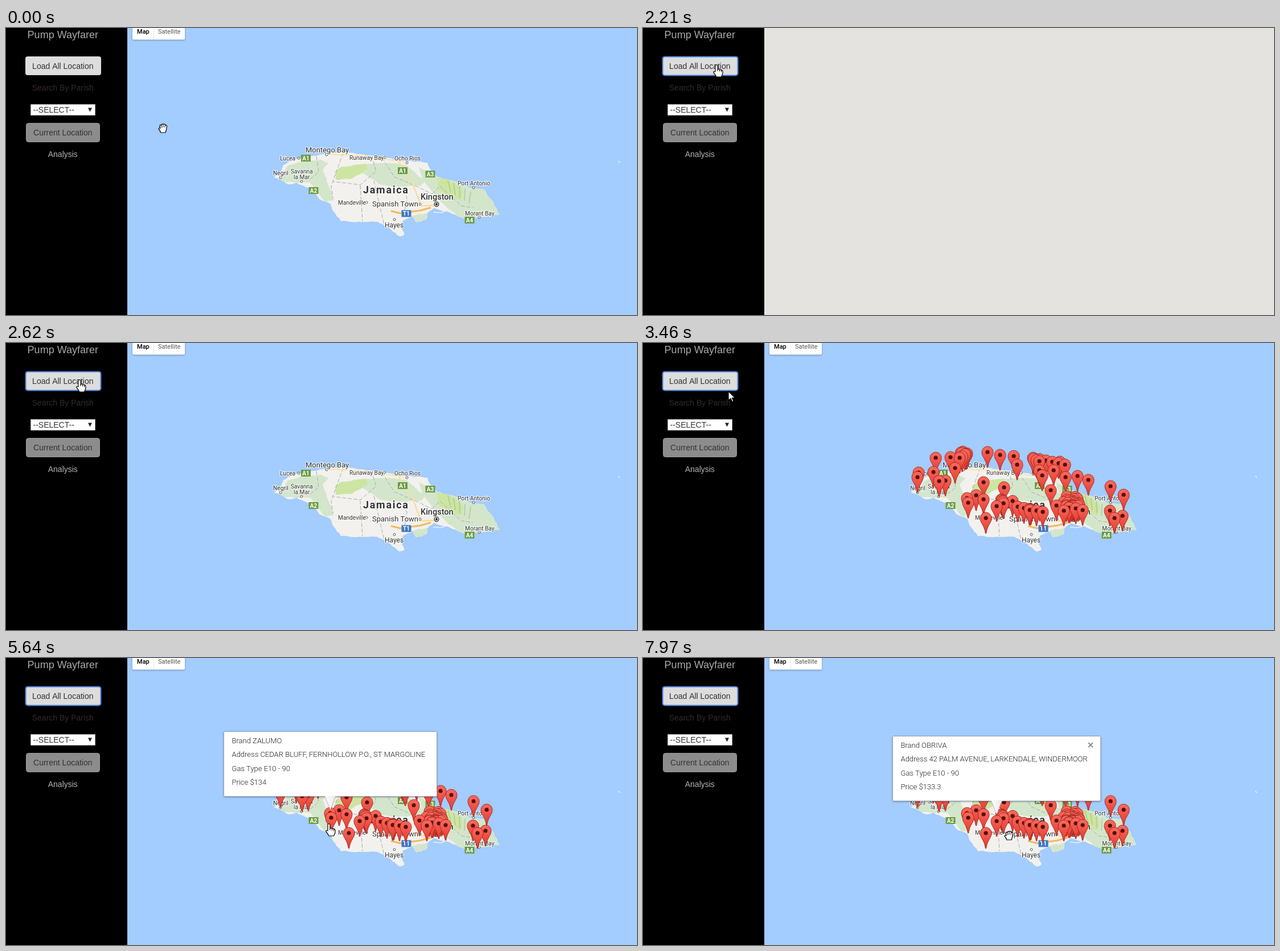
Write an HTML page with a canvas that moves like this. It is 1108 px wide and 505 px high and loops after 8000 ms.

```html
<!DOCTYPE html>
<html lang="en">
<head>
<meta charset="utf-8">
<title>Fuel station map</title>
<style>
html, body { margin: 0; width: 100%; height: 100%; overflow: hidden; background: #000; }
canvas { display: block; width: 1108px; height: 505px; }
</style>
</head>
<body>
<canvas id="stage" width="1108" height="505"></canvas>
<script>
const W = 1108, H = 505, LOOP = 8000, SIDE = 213;
const ctx = document.getElementById('stage').getContext('2d');
const ARIAL = '"Liberation Sans", Arial, sans-serif';
const ROBOTO = 'Roboto, sans-serif';

function text(c, str, x, y, font, color, align = 'left') {
  c.font = font;
  c.fillStyle = color;
  c.textAlign = align;
  c.fillText(str, x, y);
}

function box(c, x, y, w, h, r, fill, stroke) {
  c.beginPath();
  c.roundRect(x, y, w, h, r);
  if (fill) { c.fillStyle = fill; c.fill(); }
  if (stroke) { c.strokeStyle = stroke; c.stroke(); }
}

function dot(c, x, y, r, fill, stroke) {
  c.beginPath();
  c.arc(x, y, r, 0, 7);
  c.fillStyle = fill;
  c.fill();
  if (stroke) { c.strokeStyle = stroke; c.stroke(); }
}

function line(c, path, color, width, dash = []) {
  c.setLineDash(dash);
  c.strokeStyle = color;
  c.lineWidth = width;
  c.stroke(new Path2D(path));
  c.setLineDash([]);
}

function area(c, path, color) {
  c.fillStyle = color;
  c.fill(new Path2D(path));
}

function layer(paint) {
  const cv = document.createElement('canvas');
  cv.width = W;
  cv.height = H;
  paint(cv.getContext('2d'));
  return cv;
}

function random(seed) {
  return () => (seed = seed * 16807 % 2147483647) / 2147483647;
}

const pairs = flat => flat.flatMap((v, i) => i % 2 ? [] : [[v, flat[i + 1]]]);

// Closed outline whose edges get a slight seeded wobble.
function coast(flat, wobble = 1) {
  const rnd = random(19), pts = pairs(flat), path = new Path2D();
  pts.forEach(([x, y], i) => {
    const [nx, ny] = pts[(i + 1) % pts.length];
    const n = Math.ceil(Math.hypot(nx - x, ny - y) / 6);
    for (let k = 0; k < n; k++) {
      const j = k ? wobble : 0, u = k / n;
      path.lineTo(x + (nx - x) * u + (rnd() * 2 - 1) * j, y + (ny - y) * u + (rnd() * 2 - 1) * j);
    }
  });
  path.closePath();
  return path;
}

/* ---- Map ---- */
const island = coast([
  470,263, 479,256, 487,241, 505,232, 528,227, 556,222, 568,219, 592,219, 622,222, 660,227,
  700,234, 724,235, 740,237, 744,247, 757,262, 786,269, 815,281, 838,283, 853,303, 867,328,
  835,333, 806,336, 780,325, 751,317, 740,326, 738,337, 720,342, 714,331, 697,339, 693,348,
  700,363, 691,367, 674,353, 652,341, 620,341, 588,340, 573,320, 570,310, 550,301, 536,284,
  510,272, 496,275, 480,266]);

function badge(c, str, x, y, color = '#6b9c41') {
  c.fillStyle = color;
  c.fillRect(x - 8.5, y - 6, 17, 12);
  text(c, str, x, y + 3.5, '700 10px ' + ROBOTO, '#fff', 'center');
}

function label(c, str, x, y, size = 10.2, weight = 400) {
  c.lineJoin = 'round';
  c.lineWidth = 2.5;
  c.font = `${weight} ${size}px ${ROBOTO}`;
  c.strokeStyle = 'rgba(255,255,255,.75)';
  c.textAlign = 'left';
  c.strokeText(str, x, y);
  text(c, str, x, y, c.font, '#333');
}

// A town: name, label position, offset of its dot, label size.
const towns = [
  ['Lucea', 481, 233, 33, -4], ['Negril', 469, 259, 13, 4], ['Savanna', 500, 256, 19, 14],
  ['Runaway Bay', 603, 232, 61, -4], ['Ocho Rios', 682, 233, 22, 4], ['Port Antonio', 793, 277, 28, 4],
  ['Mandeville', 583, 311, 50, -4], ['Morant Bay', 806, 330, 25, 3], ['Montego Bay', 526, 219, 37, 4, 13],
  ['Spanish Town', 643, 314, 84, -4, 13], ['Hayes', 665, 351, 17, -14, 12]];

const mapLayer = layer(c => {
  const green = '#d3e6cb', lime = '#cde5a3', road = '#fbdd98';
  c.fillStyle = '#a3ccff';
  c.fillRect(SIDE, 0, W - SIDE, H);
  c.lineJoin = 'round';
  area(c, island, '#f2f1ee');
  c.save();
  c.clip(island);
  area(c, coast([476,270, 494,243, 524,234, 554,232, 566,238, 556,250, 568,282, 576,303, 560,306, 534,272]), green);
  area(c, coast([612,247, 636,239, 684,238, 704,242, 736,270, 728,278, 690,279, 658,276, 644,266]), green);
  area(c, coast([578,252, 590,244, 634,239, 635,248, 608,265, 579,267]), lime);
  area(c, coast([724,244, 756,262, 845,284, 868,332, 800,336, 764,306, 732,268]), green);
  area(c, coast([757,264, 774,264, 798,280, 803,292, 798,304, 760,286]), lime);
  area(c, coast([714,330, 740,325, 738,345, 716,342]), green);
  const hill = 'rgba(140,175,120,.4)';
  for (let i = 0; i < 5; i++) line(c, `M${776 + i * 10} ${268 + i * 5}l${5 - i * 2} 21`, hill, 2);
  line(c, 'M545 226L549 254 534 266M592 220L571 278 574 300M642 225L650 252 622 276 574 270M660 228L682 262 724 280 748 292M622 277L626 340M646 269L664 346M748 292L762 278 800 313 820 316M690 279L704 298 700 322', '#aaa', 1, [7, 3]);
  line(c, 'M568 222L630 225 700 236', '#fbe3a2', 2);
  line(c, 'M690 236L714 274 727 308M728 313L756 312', road, 2.3);
  line(c, 'M676 322L692 326 728 321 746 316', '#f5b95c', 3);
  c.restore();
  line(c, 'M750 324L764 325 772 322M1075 234L1078 237', '#f2f1ee', 1.5);

  c.lineWidth = 1;
  for (const [, x, y, dx, dy] of towns) dot(c, x + dx, y + dy, 2, '#fff', '#555');
  c.lineWidth = 1.3;
  dot(c, 756, 310, 3.8, '#fff', '#222');
  dot(c, 756, 310, 2, '#222');

  badge(c, 'A1', 526.5, 229);
  badge(c, 'A2', 540, 286);
  badge(c, 'A1', 696.5, 251);
  badge(c, 'A3', 745, 257);
  badge(c, 'A4', 814, 338);
  badge(c, 'T1', 703, 326.5, '#3d78c8');

  for (const [name, x, y, , , size] of towns) label(c, name, x, y, size);
  label(c, 'la Mar', 505, 266);
  label(c, 'Kingston', 728, 302, 14.5, 500);
  c.letterSpacing = '1.7px';
  label(c, 'Jamaica', 627, 291, 18, 700);
});

/* ---- Pins: head centres, tip 27px below ---- */
const pins = pairs([
  484,228, 482,236, 514,202, 510,227, 520,243, 531,242, 540,201, 556,202, 548,220, 605,192,
  627,197, 651,199, 657,214, 598,245, 634,254, 569,273, 571,281, 585,268, 598,275, 602,308,
  621,287, 633,282, 649,278, 696,224, 701,233, 721,224, 742,236, 763,234, 782,241, 716,259,
  821,252, 844,267, 820,295, 842,304, 828,308, 726,286, 739,295, 760,291, 772,294]);

const rnd = random(71);
function scatter(n, x, y, w, h) {
  for (let i = 0; i < n; i++) pins.push([x + w * rnd(), y + h * rnd()]);
}
function row(n, x, y, dx, dy) {
  for (let i = 0; i < n; i++) pins.push([x + dx * i, y + dy * i]);
}
scatter(7, 558, 189, 11, 12);
scatter(24, 736, 273, 33, 17);
scatter(4, 629, 275, 4, 6);
scatter(4, 673, 291, 10, 3);
row(5, 658, 288, 11, 2.3);
row(6, 685, 202, 11.2, 2.4);
row(3, 686, 204, 5, 2);
row(2, 744, 270, 15, 1);
pins.push([732, 209]);
pins.sort((a, b) => a[1] - b[1]);

function drawPin(c, x, y) {
  const g = c.createLinearGradient(0, y - 10, 0, y + 27);
  g.addColorStop(0, '#fb6a5d');
  g.addColorStop(1, '#e23a30');
  c.beginPath();
  c.arc(x, y, 10, Math.PI, 0);
  c.bezierCurveTo(x + 10, y + 9, x + 2.5, y + 12, x + 0.6, y + 27);
  c.lineTo(x - 0.6, y + 27);
  c.bezierCurveTo(x - 2.5, y + 12, x - 10, y + 9, x - 10, y);
  c.fillStyle = g;
  c.fill();
  c.lineWidth = 1;
  c.strokeStyle = '#a62a22';
  c.stroke();
  dot(c, x, y, 3.6, '#54100c');
}
const pinLayer = layer(c => pins.forEach(p => drawPin(c, ...p)));

/* ---- Sidebar and map controls ---- */
function sidebar(t) {
  const focus = t >= 1910, pressed = focus && t < 2210;
  const item = (str, y, color, size = 14) => text(ctx, str, 99.8, y, `${size}px ${ARIAL}`, color, 'center');
  ctx.fillStyle = '#000';
  ctx.fillRect(0, 0, SIDE, H);
  item('Pump Wayfarer', 18, '#a9a9a9', 18);
  box(ctx, 34, 50, 133, 33, 4, pressed ? '#cbcbcb' : '#dddddd');
  if (focus) {
    ctx.lineWidth = 2;
    box(ctx, 34.5, 50.5, 132, 33, 4, null, '#4a80d8');
  }
  ctx.lineWidth = 1;
  item('Load All Location', 72, '#333');
  item('Search By Parish', 110, '#332b29');
  box(ctx, 43.5, 134.5, 113, 19, 0, '#fff', '#a9a9a9');
  text(ctx, '--SELECT--', 47.5, 149, '14px ' + ARIAL, '#333');
  area(ctx, 'M144 140.5h7l-3.5 7Z', '#222');
  box(ctx, 35.5, 167.5, 129, 33, 4, '#8c8c8c', '#999');
  item('Current Location', 189, '#333');
  item('Analysis', 227, '#b4b4b4');
}

function shadowed(paint) {
  ctx.save();
  ctx.shadowColor = 'rgba(0,0,0,.33)';
  ctx.shadowBlur = 3;
  ctx.shadowOffsetY = 1;
  paint();
  ctx.restore();
}

function controls() {
  shadowed(() => box(ctx, 222, -10, 92, 30.5, 2, '#fff'));
  ctx.fillStyle = '#e6e6e6';
  ctx.fillRect(259, 0, 1, 20);
  text(ctx, 'Map', 230, 10, '500 11px ' + ROBOTO, '#000');
  text(ctx, 'Satellite', 267, 10, '11px ' + ROBOTO, '#565656');
}

/* ---- Info windows ---- */
const popups = [
  { from: 4570, to: 5640, tip: 520, y: 93, w: 264, rows: ['DULMOR', 'OAK DELL, BRIGHT HOLLOW,', 'E10 - 87', '$132.9'] },
  { from: 5640, to: 7010, tip: 569.5, y: 129, w: 375, rows: ['ZALUMO', 'CEDAR BLUFF, FERNHOLLOW P.O., ST MARGOLINE', 'E10 - 90', '$134'] },
  { from: 7010, to: 7820, tip: 602.5, y: 158, w: 405, rows: ['TROVAK', 'LOT 6 MANGO RIDGE, TAMARIND VALE, EASTMARLOW', 'E10 - 90', '$133.5'] },
  { from: 7820, to: LOOP, tip: 621, y: 137, w: 366, rows: ['OBRIVA', '42 PALM AVENUE, LARKENDALE, WINDERMOOR', 'E10 - 90', '$133.3'] }
];
const fields = ['Brand', 'Address', 'Gas Type', 'Price'];

function popup({ from, tip, y, w, rows }, t) {
  const x = tip - w / 2, h = 115, foot = y + h;
  shadowed(() => box(ctx, x, y, w, h, 2, '#fff'));
  ctx.lineWidth = 1;
  box(ctx, x + .5, y + .5, w - 1, h - 1, 2, null, 'rgba(70,90,120,.55)');
  const g = ctx.createLinearGradient(tip - 10, 0, tip + 10, 0);
  g.addColorStop(0, '#fff');
  g.addColorStop(1, '#e8e8e8');
  area(ctx, `M${tip - 10} ${foot - 2}h20L${tip} ${foot + 24}Z`, g);
  line(ctx, `M${tip - 9} ${foot}l9 24 9 -24`, 'rgba(0,0,0,.25)', 1);
  rows.forEach((s, i) => text(ctx, `${fields[i]} ${s}`, x + 14.5, y + 20.5 + i * 24.5, '300 13px ' + ROBOTO, '#222'));
  if (t >= from + 80) line(ctx, `M${x + w - 22} ${y + 12}l8 8m0 -8l-8 8`, '#8a8a8a', 1.8);
}

/* ---- Cursor: stepped moves along quadratic curves ---- */
// from, to, steps, control x y, end x y
const moves = [
  [70, 820, 11, 290, 215, 150, 84],
  [900, 1130, 4, 140, 72, 129, 65],
  [3460, 3460, 1, 150, 85, 150, 85],
  [3540, 4240, 10, 380, 350, 470, 262],
  [4320, 4570, 4, 500, 250, 526, 247],
  [5160, 5640, 7, 540, 275, 567, 292],
  [6330, 7010, 9, 582, 310, 599, 314],
  [7140, 7140, 1, 599, 315, 599, 315],
  [7590, 7970, 6, 610, 250, 643, 312]
];

function cursorAt(t) {
  let x = 276, y = 176;
  for (const [from, to, n, cx, cy, ex, ey] of moves) {
    if (t < from) break;
    const k = t >= to ? n : 1 + Math.floor((t - from) / (to - from) * (n - 1));
    const s = k / n, u = s * s * (3 - 2 * s), v = 1 - u;
    x = v * v * x + 2 * u * v * cx + u * u * ex;
    y = v * v * y + 2 * u * v * cy + u * u * ey;
  }
  return [x, y];
}

function overPin(x, y) {
  return pins.some(([px, py]) => {
    const dy = y - py;
    return dy <= 0 ? Math.hypot(x - px, dy) < 10 : dy < 27 && Math.abs(x - px) < 10 * (1 - dy / 27);
  });
}

const shapes = {
  arrow: ['M0 0V16L4 12.5 6.5 18.5 9 17.5 6.5 11.5H11.5Z', ''],
  pointer: ['M-2 1Q0 -1.5 2 1V8Q4 6.5 5.5 8.5 11 8 11 12V15Q10 18 8.5 21H0Q-2 17 -5 13.5 -6 10.5 -2 12Z', 'M2 8v3M5.5 8.5v3M8.5 9.5v3'],
  hand: ['M-4.5 8Q-5 5 -8 1.5 -8 -1 -5 .5L-6 -4Q-5 -7 -3.2 -4.5 -2.5 -8.5 0 -6.5 2.5 -8.5 3.5 -5 6 -6.5 6.5 -3L5.5 3 4 8Z', 'M-3.2 -4.5l1 4M0 -6.5v5M3.5 -5l-.7 4']
};

function cursor(t) {
  const [x, y] = cursorAt(t);
  const onButton = x > 34 && x < 167 && y > 50 && y < 83;
  let kind = 'hand';
  if (x < SIDE) kind = onButton ? 'pointer' : 'arrow';
  else if (t >= 2720 && overPin(x, y)) kind = 'pointer';
  const [body, creases] = shapes[kind];
  ctx.save();
  ctx.translate(Math.round(x), Math.round(y));
  ctx.lineJoin = 'round';
  area(ctx, body, '#fff');
  line(ctx, body, '#000', 1.2);
  line(ctx, creases, '#000', 1);
  ctx.restore();
}

/* ---- Scene ---- */
function draw(t) {
  const reloading = t >= 2210 && t < 2530;
  ctx.fillStyle = '#e5e3df';
  ctx.fillRect(0, 0, W, H);
  if (!reloading) {
    ctx.globalAlpha = t >= 2530 && t < 2620 ? 0.61 : 1;
    ctx.drawImage(mapLayer, 0, 0);
    ctx.globalAlpha = 1;
    if (t >= 2720) ctx.drawImage(pinLayer, 0, 0);
    controls();
  }
  popups.forEach(p => { if (t >= p.from && t < p.to) popup(p, t); });
  sidebar(t);
  cursor(t);
}

const start = performance.now();
function frame() {
  draw((performance.now() - start) % LOOP);
  requestAnimationFrame(frame);
}
frame();
</script>
</body>
</html>
```
